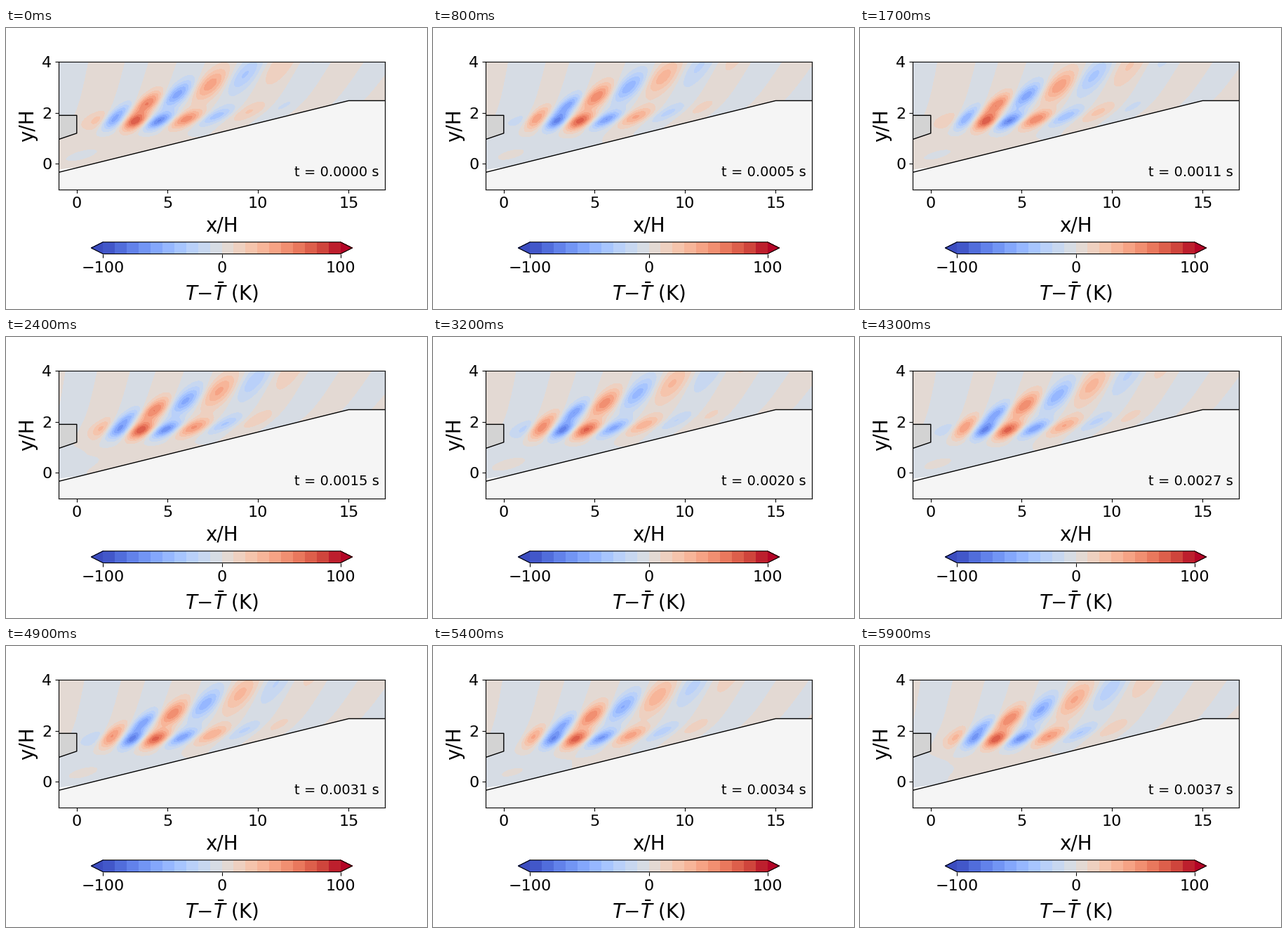
A matplotlib script for the animation above (6 s loop, 600 by 400 pixels).

```python
import numpy as np
import matplotlib.pyplot as plt
from matplotlib.animation import FuncAnimation

W, H = 600, 400
FRAMES, INTERVAL = 60, 100
DT = 1 / 16000       # seconds of flow time per frame
ADVANCE = 0.344      # wave advance per frame, in half periods
LEVELS = np.arange(-100, 101, 10)
RAMP_LOW, RAMP_TOP = -0.33, 2.475


def px_rect(left, top, width, height):
    return [left / W, 1 - (top + height) / H, width / W, height / H]


def bell(v, centre, width):
    return np.exp(-0.5 * ((v - centre) / width) ** 2)


def skewed(v, centre, left, right):
    return bell(v, centre, np.where(v < centre, left, right))


def ramp_y(x):
    return RAMP_LOW + (RAMP_TOP - RAMP_LOW) * (x + 1) / 16


def wave(amp, phase):
    return amp * np.exp(1j * np.pi * phase)


def build_mode():
    """Complex wave mode; its real part at a given phase is the field."""
    x, y = np.meshgrid(np.linspace(-1, 17, 271), np.linspace(-0.4, 4, 133))

    # u: position along the row once the slant of the wave fronts is undone;
    # the fronts lean most in the lower row and stand up further out
    d = y - 1.66
    lean = 0.6 * d + 0.6 * np.tanh(d / 0.7)
    row = (x - 0.5 * lean) / (1 + 0.085 * lean)
    u = row - 3.2
    phase = (0.67 * u + 0.16 * np.tanh(u / 1.5)
             - 0.25 * np.exp(-((row - 1) / 0.6) ** 2))

    lower = (72 * skewed(row, 3.3, 1.25, 3.2)
             * bell(y, 1.67 + 0.012 * np.maximum(u, 0) ** 2, 0.235))
    spread = 0.28 + 0.045 * np.clip(u, -1.5, 6)
    upper = 55 * skewed(row, 3.3, 1.15, 3.4) * bell(y, 2.37 + 0.27 * u, spread)

    # faint, slower waves hug the ramp
    near_wall = 1 / (1 + np.exp((y - 1.1) / 0.08))
    wall_phase = -0.3 + 0.1 * x
    streak = 10 * bell(x, 0.4, 0.6) * bell(y - ramp_y(x), 0.45, 0.13)

    mode = (wave(lower + upper + 5 * (1 - near_wall), phase)
            + wave(5 * near_wall, wall_phase) + wave(streak, 0.85))
    return x, y, mode


X, Y, MODE = build_mode()

fig = plt.figure(figsize=(W / 100, H / 100), dpi=100, facecolor="white")
ax = fig.add_axes(px_rect(75, 48, 465, 181.8))
cax = fig.add_axes(px_rect(121.5, 304.7, 372, 16.9))


def draw_field(i):
    field = (MODE * np.exp(-1j * np.pi * ADVANCE * i)).real
    return ax.contourf(X, Y, field, levels=LEVELS, cmap="coolwarm",
                       extend="both", zorder=0)


def fill(points, color, z=2):
    ax.fill(*zip(*points), facecolor=color, edgecolor="none", zorder=z)


def outline(points):
    ax.plot(*zip(*points), color="black", linewidth=1, zorder=2.2)


layer = draw_field(0)

ramp = [(-1, RAMP_LOW), (15, RAMP_TOP), (17, RAMP_TOP)]
nozzle = [(-1, 0.96), (0, 1.2), (0, 1.9), (-1, 1.9)]
fill([(-1, RAMP_LOW), (-1, -0.22), (0.2, ramp_y(0.2))], "white", 1)
fill(ramp + [(17, -1), (-1, -1)], "whitesmoke")
fill(nozzle, "lightgray")
outline(ramp)
outline(nozzle)
clock = ax.text(12, -0.49, "", fontsize=14, zorder=4)

ax.set(xlim=(-1, 17), ylim=(-1, 4), xticks=[0, 5, 10, 15], yticks=[0, 2, 4])
ax.tick_params(labelsize=16)
ax.tick_params(axis="x", pad=4.2)
ax.set_xlabel("x/H", fontsize=20, labelpad=4.8)
ax.set_ylabel("y/H", fontsize=20)

bar = fig.colorbar(layer, cax=cax, orientation="horizontal",
                   ticks=[-100, 0, 100])
bar.ax.tick_params(labelsize=16, pad=4.2)
bar.set_label("$T$\u2212$\\bar{T}$ (K)", fontsize=20, labelpad=5.4)


def update(i):
    global layer
    layer.remove()
    layer = draw_field(i)
    clock.set_text(f"t = {i * DT:.4f} s")
    return layer, clock


anim = FuncAnimation(fig, update, frames=FRAMES, interval=INTERVAL,
                     repeat=True, repeat_delay=0, blit=False)
plt.show()
```
